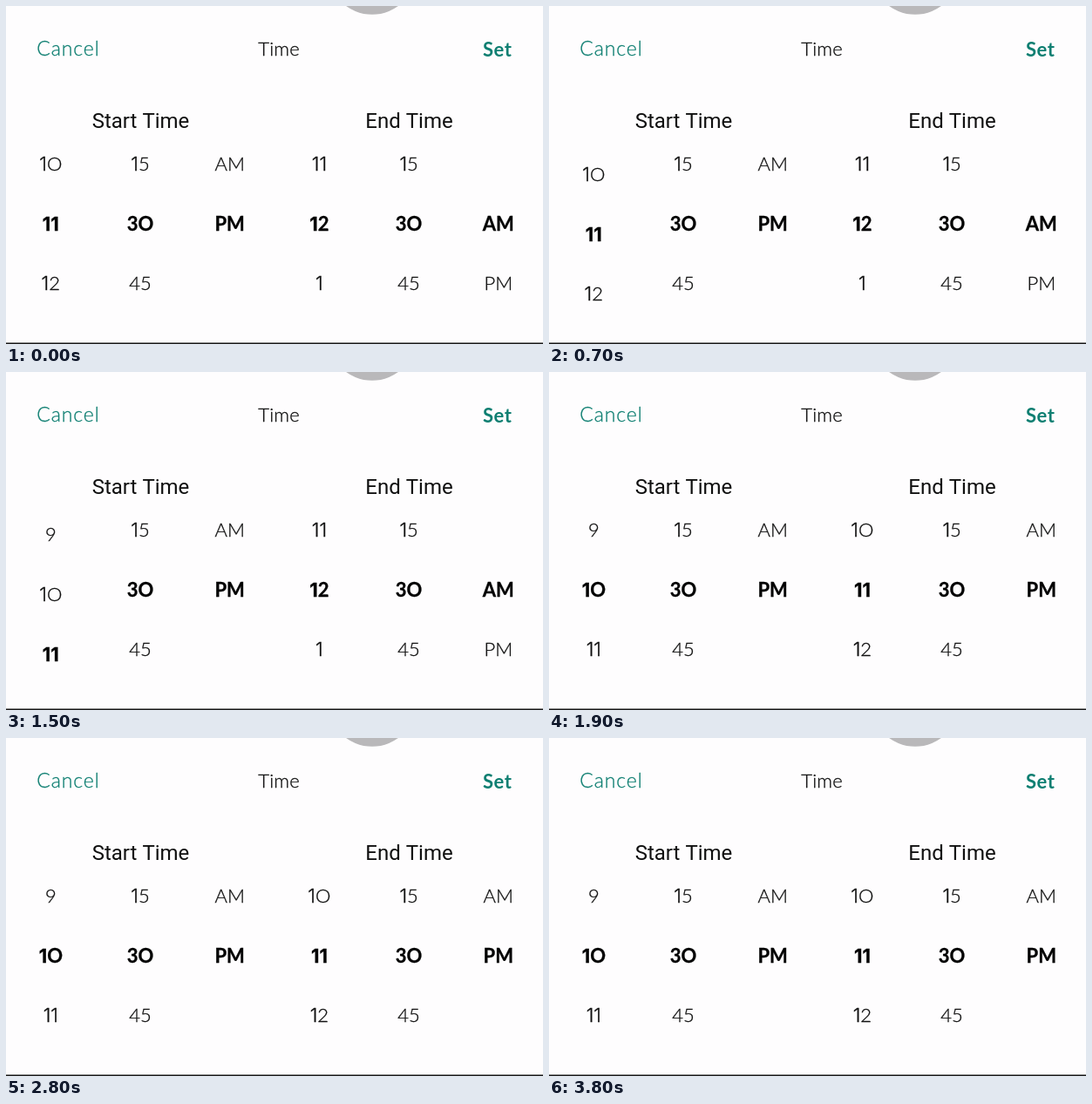
These frames come from a looping animation (616 px wide and 388 px high, 4.3 s). An HTML page with a canvas:

```html
<!DOCTYPE html>
<html lang="en">
<head>
<meta charset="utf-8">
<title>Time picker</title>
<style>
  html, body { margin: 0; width: 100%; height: 100%; overflow: hidden; background: #fefdfe; }
  canvas { display: block; width: 616px; height: 388px; }
</style>
</head>
<body>
<canvas></canvas>
<script>
const WIDTH = 616, HEIGHT = 388, LOOP = 4300, STEP = 100;
const ROW = 68.5, MIDDLE = 250, COLUMN = 102.7, FIRST_COLUMN = 51.3;
const INK = '#101010', TEAL = '#0f7f72', PAPER = '#fefdfe';
const SETTLED = 1700;

const canvas = document.querySelector('canvas');
const ctx = canvas.getContext('2d');
const scale = window.devicePixelRatio || 1;
canvas.width = WIDTH * scale;
canvas.height = HEIGHT * scale;

// Hour wheel: [time in ms, hour at the middle]
const hourPath = [[400, 11], [700, 10.83], [1100, 7.16], [1500, 9.92], [1700, 10]];

function hourAt(time) {
  if (time <= hourPath[0][0]) return hourPath[0][1];
  for (let i = 1; i < hourPath.length; i++) {
    const [t0, a] = hourPath[i - 1], [t1, b] = hourPath[i];
    if (time <= t1) {
      const k = (time - t0) / (t1 - t0);
      return a + (b - a) * (1 - Math.cos(Math.PI * k)) / 2;
    }
  }
  return hourPath.at(-1)[1];
}

// A hairline outline brings the light and bold weights to the right thickness.
function inkText(text, x, y, font, color, outline) {
  ctx.font = font;
  ctx.fillStyle = ctx.strokeStyle = color;
  ctx.lineWidth = outline;
  ctx.fillText(text, x, y);
  if (outline) ctx.strokeText(text, x, y);
}

function label(text, x, y, { color = INK, font = '300 22px Lato, sans-serif', spacing = 0, outline = 0.3 } = {}) {
  ctx.textAlign = 'center';
  ctx.letterSpacing = spacing + 'px';
  inkText(text, x + spacing / 2, y, font, color, outline);
}

// Wheel lettering has round zeros and narrow ones without a foot.
function wheelText(text, x, y, bold) {
  const glyphs = [...text].map(char => {
    const family = char === '1' ? 'Inter' : 'Lato';
    const font = `${bold ? 700 : 300} 22px ${family}, sans-serif`;
    ctx.font = font;
    const shape = char === '0' ? 'O' : char;
    return { shape, font, width: ctx.measureText(shape).width };
  });
  let left = x - glyphs.reduce((sum, glyph) => sum + glyph.width, 0) / 2;
  for (const { shape, font, width } of glyphs) {
    inkText(shape, left, y, font, bold ? '#000' : INK, 0.3);
    left += width;
  }
}

const hours = i => String((i + 11) % 12 + 1);
const minutes = i => ['00', '15', '30', '45'][i];
const halves = i => ['AM', 'PM'][i];

function wheel(column, textAt, position, selected = position) {
  const nearest = Math.round(position);
  for (let i = nearest - 2; i <= nearest + 2; i++) {
    const text = textAt(i);
    if (!text) continue;
    const bold = i === selected;
    const baseline = MIDDLE + (bold ? 8 : 7.4) + (i - position) * ROW;
    wheelText(text, FIRST_COLUMN + column * COLUMN, baseline, bold);
  }
}

function draw(time) {
  ctx.setTransform(scale, 0, 0, scale, 0, 0);
  ctx.fillStyle = PAPER;
  ctx.fillRect(0, 0, WIDTH, HEIGHT);

  ctx.fillStyle = '#b9b8ba';
  ctx.beginPath();
  ctx.arc(420, -40.6, 50.4, 0, Math.PI * 2);
  ctx.fill();
  ctx.fillStyle = '#161616';
  ctx.fillRect(0, 386.5, WIDTH, 1.5);

  label('Cancel', 71, 57, { color: TEAL, font: '300 23px Lato, sans-serif', spacing: 0.9 });
  label('Time', 313, 57, { spacing: 0.3 });
  label('Set', 563.5, 57.7, { color: TEAL, font: '700 22px Lato, sans-serif', spacing: 0.6, outline: 0 });
  const heading = { font: '24px Roboto, sans-serif', outline: 0 };
  label('Start Time', 154.5, 139.5, heading);
  label('End Time', 462.5, 139.5, heading);

  const settled = time >= SETTLED;
  ctx.save();
  ctx.beginPath();
  ctx.rect(0, MIDDLE - ROW * 1.5, WIDTH, ROW * 3);
  ctx.clip();
  ctx.textAlign = 'left';
  ctx.letterSpacing = '0px';
  wheel(0, hours, hourAt(time), settled ? 10 : 11);
  wheel(1, minutes, 2);
  wheel(2, halves, 1);
  wheel(3, hours, settled ? 11 : 12);
  wheel(4, minutes, 2);
  wheel(5, halves, settled ? 1 : 0);
  ctx.restore();
}

const start = performance.now();
function tick() {
  const time = (performance.now() - start) % LOOP;
  draw(Math.floor(time / STEP) * STEP);
  requestAnimationFrame(tick);
}
tick();
</script>
</body>
</html>
```
